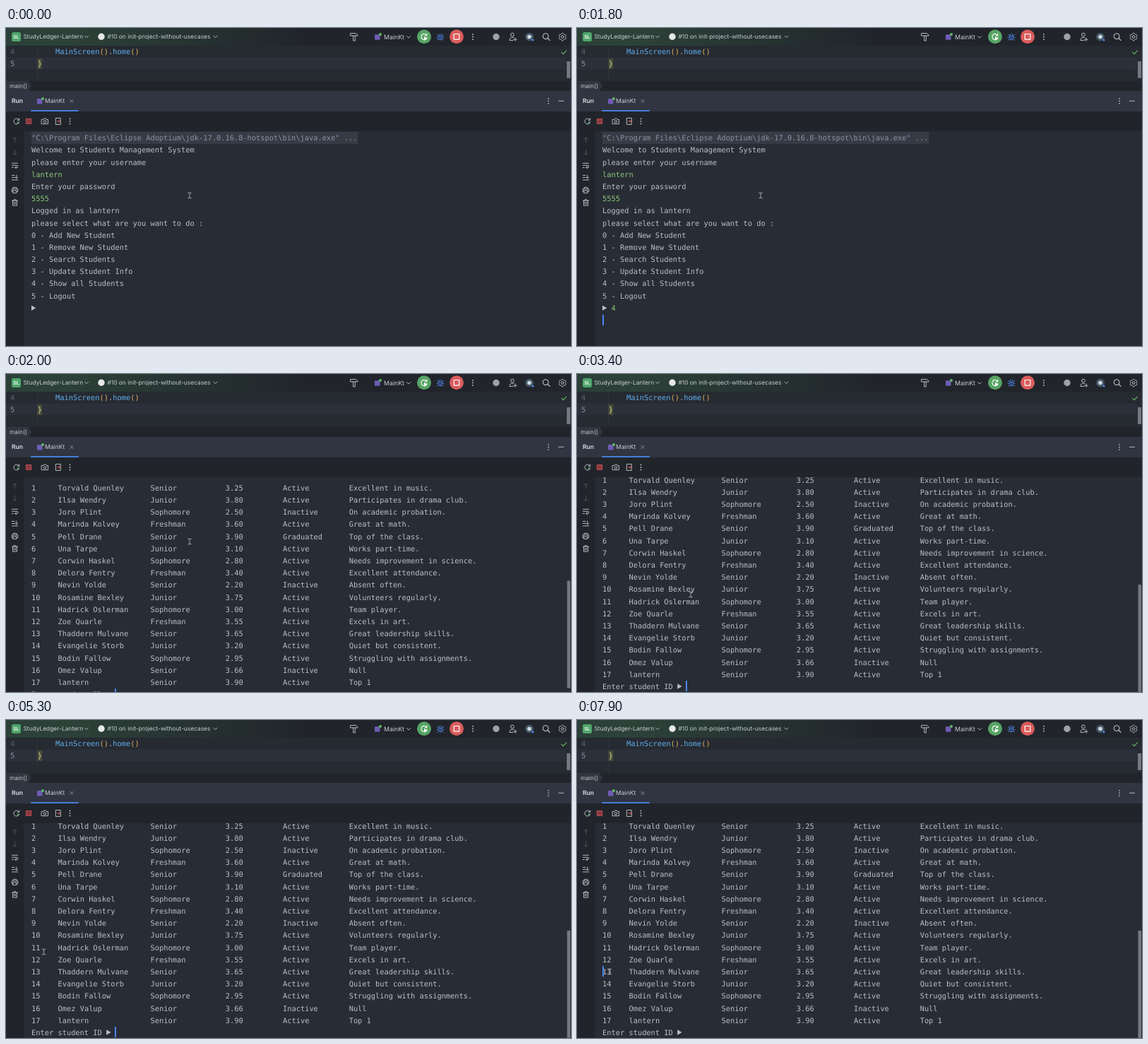
An HTML page with a canvas that plays this animation: 800 px wide and 450 px high, repeating every 8 s.

```html
<!DOCTYPE html>
<html lang="en">
<head>
<meta charset="utf-8">
<title>Console session</title>
<style>
html, body { margin: 0; width: 100%; height: 100%; overflow: hidden; background: #282c34; }
canvas { display: block; }
</style>
</head>
<body>
<canvas id="stage" width="800" height="450"></canvas>
<script>
const ctx = document.getElementById('stage').getContext('2d');
ctx.textRendering = 'geometricPrecision';
ctx.lineCap = ctx.lineJoin = 'round';

const LOOP = 8000, CHAR = 6.245, LINE = 17.19, LEFT = 36;
const MONO = '10.37px "DejaVu Sans Mono", monospace';
const PANEL = '#21252b', CONSOLE = '#282c34', TEXT = '#bbbfc7', INPUT = '#89ca78';
const ICON = '#bcc0c7', RED = '#db5c5c', GREEN = '#57a464', BLUE = '#4a88f0', PURPLE = '#6f5bb5';
const THUMB = '#74787f';
const TABLE_AT = 1900, CLICK_AT = 6850;

const user = 'lantern';
const menu = [
  'Welcome to Students Management System', 'please enter your username', user,
  'Enter your password', '5555', 'Logged in as ' + user,
  'please select what are you want to do :', '0 - Add New Student', '1 - Remove New Student',
  '2 - Search Students', '3 - Update Student Info', '4 - Show all Students', '5 - Logout'
];
const columns = [0, 6, 27, 44, 57, 72];
const students = `Torvald Quenley|Senior|3.25|Active|Excellent in music.
Ilsa Wendry|Junior|3.80|Active|Participates in drama club.
Joro Plint|Sophomore|2.50|Inactive|On academic probation.
Marinda Kolvey|Freshman|3.60|Active|Great at math.
Pell Drane|Senior|3.90|Graduated|Top of the class.
Una Tarpe|Junior|3.10|Active|Works part-time.
Corwin Haskel|Sophomore|2.80|Active|Needs improvement in science.
Delora Fentry|Freshman|3.40|Active|Excellent attendance.
Nevin Yolde|Senior|2.20|Inactive|Absent often.
Rosamine Bexley|Junior|3.75|Active|Volunteers regularly.
Hadrick Oslerman|Sophomore|3.00|Active|Team player.
Zoe Quarle|Freshman|3.55|Active|Excels in art.
Thaddern Mulvane|Senior|3.65|Active|Great leadership skills.
Evangelie Storb|Junior|3.20|Active|Quiet but consistent.
Bodin Fallow|Sophomore|2.95|Active|Struggling with assignments.
Omez Valup|Senior|3.66|Inactive|Null
${user}|Senior|3.90|Active|Top 1`.split('\n').map((row, i) => [i + 1, ...row.split('|')]);

// Pointer path: time, x, y
const pointer = [
  [0, 260, 237], [2750, 260, 237], [3400, 161, 312], [3750, 161, 312], [4200, 115, 264],
  [4600, 73, 275], [5300, 53.5, 328], [5600, 53, 328], [6400, 37.5, 334],
  [CLICK_AT, 40, 356], [7050, 40, 356], [7500, 53, 361], [7900, 46, 356], [LOOP, 46, 356]
];

function rect(x, y, w, h, color, r = 0) {
  ctx.fillStyle = color;
  ctx.beginPath();
  ctx.roundRect(x, y, w, h, r);
  ctx.fill();
}
function disc(x, y, r, color) {
  rect(x - r, y - r, 2 * r, 2 * r, color, r);
}
function icon(x, y, d, color = ICON, width = 0.95) {
  ctx.save();
  ctx.translate(x, y);
  ctx.strokeStyle = color;
  ctx.lineWidth = width;
  ctx.stroke(new Path2D(d));
  ctx.restore();
}
function kebab(x, y) {
  for (const dy of [-3.5, 0, 3.5]) disc(x, y + dy, 0.9, ICON);
}
// Text placed by the vertical centre of its capitals
function mono(text, x, y, color = TEXT) {
  ctx.font = MONO;
  ctx.fillStyle = color;
  ctx.fillText(text, x, y + 3.7);
}
function label(text, x, y, size = 8.4, color = '#c9ccd2', weight = 400) {
  ctx.font = `${weight} ${size}px Inter, sans-serif`;
  ctx.fillStyle = color;
  ctx.fillText(text, x, y + size * 0.36);
}
function arrow(x, y) {
  ctx.fillStyle = TEXT;
  ctx.fill(new Path2D(`M${x} ${y - 3.7}l6.3 3.7l-6.3 3.7z`));
}
function caret(x, y) {
  rect(x, y - 7.5, 2, 15, BLUE);
}

const CHEVRON = 'M-2.5 -1.2L0 1.3L2.5 -1.2';
const RERUN = 'M3.4 -2A4 4 0 1 0 3.9 1M3.7 -4V-1.6H1.3';

function topBar() {
  const tint = ctx.createLinearGradient(0, 0, 420, 0);
  tint.addColorStop(0, '#2b4038');
  tint.addColorStop(0.2, '#2c4238');
  tint.addColorStop(1, PANEL);
  rect(0, 0, 800, 25, tint);
  rect(8, 6, 13, 13, '#4fa56b', 2.5);
  label('SL', 10.2, 12.5, 7, '#fff', 600);
  label('StudyLedger-Lantern', 24.5, 12.3);
  icon(114, 12.3, CHEVRON);
  disc(135, 12.3, 4.7, '#e6e8ec');
  label('#10 on init-project-without-usecases', 143.5, 12.3);
  icon(296.5, 12.3, CHEVRON);

  icon(493, 12.5, 'M-5 -5H2.5L5 -2.5V-1.5H-5ZM-1.3 -1.5V5.5H1.3V-1.5');
  rect(522, 9.3, 7.5, 7.5, PURPLE, 1);
  disc(530, 9, 2, '#5fb865');
  label('MainKt', 535, 12.5, 8.8);
  icon(570, 12.8, CHEVRON);
  disc(592, 12.3, 10, GREEN);
  icon(592, 12.3, RERUN, '#fff', 1.1);
  ctx.fillStyle = '#fff';
  ctx.fill(new Path2D('M592 12l5 3l-5 3z'));
  icon(615, 12.5, 'M-2.5 -1Q-2.5 -4 0 -4T2.5 -1V1.5Q2.5 4.5 0 4.5T-2.5 1.5ZM-2.5 -1H2.5M0 -1V4.5M-4.6 -3L-2.5 -1.5M4.6 -3L2.5 -1.5M-5 1H-2.5M5 1H2.5M-4.5 4.5L-2.3 3M4.5 4.5L2.3 3', '#4c7fe0', 0.9);
  disc(638, 12.3, 10, RED);
  icon(638, 12.3, 'M-3.8 -3.8H3.8V3.8H-3.8Z', '#fff', 1.2);
  kebab(661, 12.5);

  disc(694, 12.5, 4.7, '#9da1a8');
  icon(718, 12.5, 'M-3.5 -3A2.4 2.4 0 1 0 1.3 -3A2.4 2.4 0 1 0 -3.5 -3ZM1 1.2Q-5 -0.5 -5 5H0M3 1.5V6M0.8 3.8H5.2');
  disc(741, 12.5, 5.8, '#48596a');
  disc(741, 12.5, 2.8, '#cfdde4');
  disc(746, 17, 1.5, '#548af7');
  icon(765, 12.5, 'M3 -0.8A3.9 3.9 0 1 1 -4.8 -0.8A3.9 3.9 0 1 1 3 -0.8M2 2L5 5', ICON, 1.1);
  let gear = '';
  for (let i = 0; i <= 48; i++) {
    const a = i / 48 * 2 * Math.PI, r = 4.7 + 0.7 * Math.cos(6 * a);
    gear += (i ? 'L' : 'M') + r * Math.sin(a) + ' ' + r * Math.cos(a);
  }
  icon(788, 12.5, gear + 'M1.8 0A1.8 1.8 0 1 1 -1.8 0A1.8 1.8 0 1 1 1.8 0');
}

function editor() {
  rect(0, 25, 800, 50, '#262a31');
  rect(0, 41.5, 793, 17, '#2b303a');
  mono('4', 6, 33, '#5a6270');
  mono('5', 6, 50, '#8a92a0');
  rect(44, 25, 0.7, 50, '#343943');
  rect(44.5, 43, 6.5, 15, '#474c38');
  mono('}', 44.8, 50, '#ddd6a0');
  let x = 70;
  for (const [part, color] of [['MainScreen', '#61afef'], ['()', '#e0b35c'], ['.', TEXT], ['home', '#61afef'], ['()', '#e0b35c']]) {
    mono(part, x, 33, color);
    x += part.length * CHAR;
  }
  icon(790, 34.5, 'M-3.2 0L-1 2.4L3.4 -2.4', '#5fad65', 1.3);
  rect(794, 47, 5, 24, THUMB, 1);
  rect(0, 75, 800, 14, PANEL);
  ctx.fillStyle = '#30353e';
  ctx.fill(new Path2D('M0 75H32L36 82L32 89H0Z'));
  label('main()', 5, 82, 8.4, '#c3c7ce');
}

function runHeader() {
  rect(0, 89, 800, 29, '#303541');
  label('Run', 8, 103.3, 8.6, '#dfe1e5', 600);
  rect(44, 100, 7.5, 7.5, PURPLE, 1);
  disc(52, 100, 2, '#5fb865');
  label('MainKt', 55, 103.3, 8.6);
  icon(93, 103.5, 'M-2 -2L2 2M2 -2L-2 2', '#9da1a9', 0.8);
  rect(35, 116.2, 68, 1.8, BLUE, 0.9);
  kebab(768, 103.3);
  icon(786, 103.3, 'M-3.5 0H3.5');

  rect(0, 118, 800, 28, PANEL);
  rect(0, 146, 25.5, 304, PANEL);
  icon(15, 132, RERUN);
  disc(17, 134, 1.5, GREEN);
  rect(28.4, 128.2, 7.6, 7.6, '#8c3b41', 1);
  icon(32.2, 132, 'M-3.5 -3.5H3.5V3.5H-3.5Z', '#c9545a', 0.8);
  icon(55, 132, 'M-4.5 -2.5H-2.3L-1.3 -4H1.3L2.3 -2.5H4.5V3.7H-4.5ZM1.8 0.4A1.8 1.8 0 1 1 -1.8 0.4A1.8 1.8 0 1 1 1.8 0.4');
  icon(74, 132, 'M-3.3 -4.5H3.3V4.5H-3.3Z');
  icon(74.5, 132, 'M-2 0H2M0.3 -1.7L2 0L0.3 1.7', RED);
  kebab(90.5, 132);

  icon(12.5, 158.5, 'M0 3.5V-3.5M-2.8 -0.8L0 -3.5L2.8 -0.8', '#4c515a');
  icon(12.5, 176, 'M0 -3.5V3.5M-2.8 0.8L0 3.5L2.8 0.8', '#4c515a');
  icon(12.5, 194.3, 'M-4 -3H4M-4 0H2.5Q4.3 0 4.3 1.6T2.5 3.2H0.5M2 1.7L0.4 3.2L2 4.7M-4 3.2H-2');
  icon(12.5, 211.5, 'M-4 -3H-0.5M-4 0H-0.5M-4 3.5H4.3M2.3 -3.5V1.3M0.5 -0.4L2.3 1.3L4.1 -0.4');
  icon(12.5, 229.5, 'M-2.5 -1.7V-4H2.5V-1.7M-2.5 2H-4.2V-1.7H4.2V2H2.5M-2.5 0.6H2.5V4H-2.5Z');
  icon(12.5, 247, 'M-4 -2.7H4M-1.5 -2.7V-4.2H1.5V-2.7M-3 -2.7V4.2H3V-2.7M-1 -0.6V2.2M1 -0.6V2.2');
}

function caretOn(t) {
  if (t >= CLICK_AT) return (t - CLICK_AT) % 1000 < 500;
  if (t >= 1400 && t < 2750) return true;
  return t % 1000 >= 250 && t % 1000 < 750;
}

function menuScreen(t) {
  const row = i => 155.5 + i * LINE;
  rect(LEFT, 147, 462, 17, '#363b45');
  mono('"C:\\Program Files\\Eclipse Adoptium\\jdk-17.0.16.8-hotspot\\bin\\java.exe" ...', LEFT, row(0), '#8b929f');
  menu.forEach((line, i) => mono(line, LEFT, row(i + 1), i === 2 || i === 4 ? INPUT : TEXT));
  arrow(LEFT, row(14));
  const typed = t >= 1400, entered = t >= 1800;
  if (typed) mono('4', LEFT + 2 * CHAR, row(14), INPUT);
  if (caretOn(t)) {
    if (entered) caret(LEFT, row(15));
    else caret(LEFT + (typed ? 3 : 2) * CHAR, row(14));
  }
}

function tableScreen(t) {
  const left = Math.max(0, 1 - (t - TABLE_AT) / 300);
  const shift = 25.4 * left * left;
  const row = i => 150 + shift + (i - 1) * LINE;
  mono('-'.repeat(102), LEFT, row(0));
  students.forEach((cells, i) =>
    cells.forEach((cell, c) => mono(cell, LEFT + columns[c] * CHAR, row(i + 1))));
  mono('Enter student ID', LEFT, row(18));
  arrow(LEFT + 17 * CHAR, row(18) - 0.3);
  if (caretOn(t)) {
    if (t < CLICK_AT) caret(LEFT + 19 * CHAR - 0.7, row(18) - 0.7);
    else caret(LEFT, row(13) - 0.5);
  }
  rect(794.5, 298 - shift / 2, 4.5, 152, THUMB, 1);
}

function drawPointer(t) {
  const i = pointer.findIndex(p => p[0] > t);
  const [t0, x0, y0] = pointer[i - 1], [t1, x1, y1] = pointer[i];
  const k = (t - t0) / (t1 - t0), e = k * k * (3 - 2 * k);
  icon(x0 + (x1 - x0) * e, y0 + (y1 - y0) * e, 'M-2.3 -3.7H-0.6L0 -3.2L0.6 -3.7H2.3M0 -3.2V3.2M-2.3 3.7H-0.6L0 3.2L0.6 3.7H2.3', '#b4b7bd', 0.9);
}

function frame(now) {
  const t = now % LOOP;
  rect(0, 0, 800, 450, CONSOLE);
  topBar();
  editor();
  runHeader();
  ctx.save();
  ctx.beginPath();
  ctx.rect(25.5, 146, 774.5, 304);
  ctx.clip();
  (t < TABLE_AT ? menuScreen : tableScreen)(t);
  drawPointer(t);
  ctx.restore();
  requestAnimationFrame(frame);
}
frame(performance.now());
</script>
</body>
</html>
```
